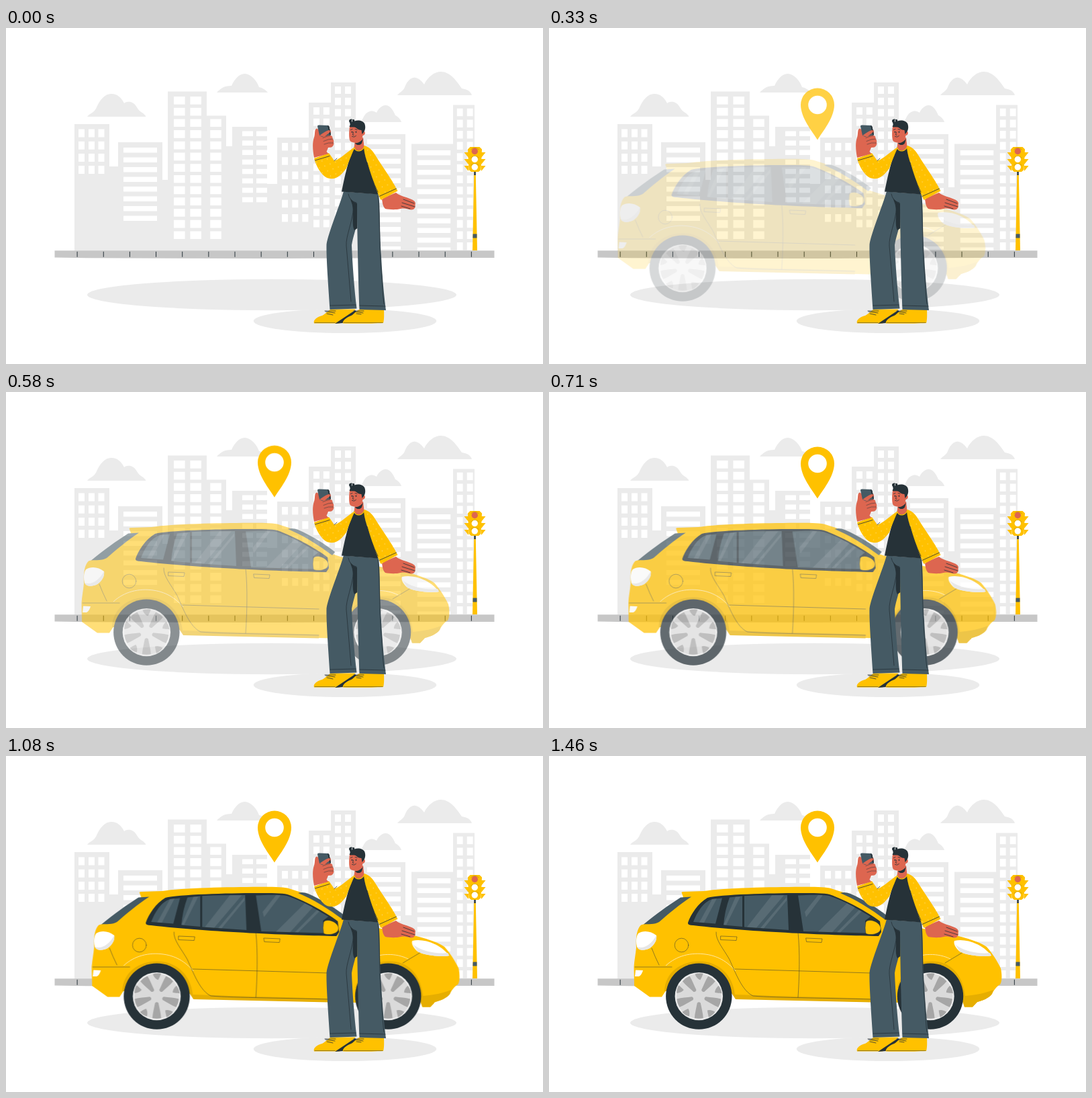
Recreate the animation shown at these times as an HTML page. Size 800 by 500 pixels, loop 1.5 s.

```html
<!DOCTYPE html>
<html lang="en">
<head>
<meta charset="utf-8">
<title>Waiting for a ride</title>
<style>
html, body { margin: 0; width: 100%; height: 100%; overflow: hidden; background: #fff; }
svg { display: block; width: 100vw; height: 100vh; }
.wall { fill: #ebebeb; }
.panes { fill: none; stroke: #fff; }
.yellow { fill: #ffc100; }
.shade { fill: #e6ae00; }
.dark { fill: #263238; }
.slate { fill: #455a64; }
.skin { fill: #dd6650; }
.white { fill: #fff; }
.line { fill: none; stroke: #263238; stroke-width: .8; stroke-linecap: round; stroke-linejoin: round; }
.thin { stroke-width: .5; }
.pin, .car { animation: 1500ms cubic-bezier(.36, -.01, .5, 1.38) infinite; }
.pin { animation-name: rise; }
.car { animation-name: arrive; }
@keyframes rise {
  0% { opacity: 0; transform: translateY(30px); }
  44.5%, 100% { opacity: 1; transform: none; }
}
@keyframes arrive {
  0% { opacity: 0; transform: translateX(-30px); }
  97.2%, 100% { opacity: 1; transform: none; }
}
</style>
</head>
<body>
<svg viewBox="0 0 800 500">
  <defs>
    <pattern id="dots" width="13" height="11" patternUnits="userSpaceOnUse" patternTransform="rotate(20)">
      <g fill="#ffdc78"><circle cx="3" cy="3" r=".7"/><circle cx="9.5" cy="8.500" r=".7"/></g>
    </pattern>
    <path id="gap" fill="#a6a6a6" d="M-2.500 10C-4 18-6 25-6.500 32.500Q0 34 6.500 32.500C6 25 4 18 2.500 10Q0 7.500-2.500 10ZM-16 18.500C-20.500 20.500-24 23-25 23.500Q-20.500 28.500-14.500 30C-13.500 25-14 21-16 18.500Z"/>
    <g id="wheel">
      <circle class="dark" r="49.200"/>
      <circle r="35.700" fill="#ebebeb"/>
      <circle r="33.300" fill="#dadada"/>
      <use href="#gap"/>
      <use href="#gap" transform="rotate(72)"/>
      <use href="#gap" transform="rotate(144)"/>
      <use href="#gap" transform="rotate(216)"/>
      <use href="#gap" transform="rotate(288)"/>
    </g>
    <path id="sleeveL" d="M520 177C509 183 499 195 489 197.500L481 186L459 194C462 206 471 221 480 223.500C492 227 500 218 507 209C511 197 516 186 520 177Z"/>
    <path id="sleeveR" d="M533 175C540 176 546 182 550 189C561 207 575 225 583.500 242.500L558.500 256C553 245 542 215 538 200C535 190 533 182 533 175Z"/>
  </defs>

  <!-- City -->
  <path class="wall" d="M102 332V143H154V206H167V170H233V226H241V94.500H299V130.500H328V176H337V147H389V232H404V163H451V111H484V81H521V158H595V237H604V172.500H666V114.500H698V332Z"/>
  <g class="panes">
    <path stroke-width="9" stroke-dasharray="12 6.200" d="M112.500 150.500v67M127.500 150.500v67M142 150.500v67"/>
    <path stroke-width="50" stroke-dasharray="7.500 7" d="M200 178v109.500"/>
    <path stroke-width="16.500" stroke-dasharray="11.700 5" d="M258.300 102v212.500M282.700 102v212.500M312.500 135.400v179"/>
    <path stroke-width="16" stroke-dasharray="7.500 6.550" d="M360 153.500v106.500M381 153.500v106.500"/>
    <path stroke-width="9" stroke-dasharray="11.500 9.700" d="M415.500 171v118M430.800 171v118M445.800 171v118"/>
    <path stroke-width="9" stroke-dasharray="11 5.750" d="M462.500 118v179.500M477.300 118v179.500M494.500 87v211M509.500 87v211"/>
    <path stroke-width="50" stroke-dasharray="7.500 7" d="M563 165.500v164"/>
    <path stroke-width="49.500" stroke-dasharray="7.500 6.950" d="M637.500 182v149"/>
    <path stroke-width="8.800" stroke-dasharray="11.500 5.100" d="M676.200 119.800v211M691.200 119.800v211"/>
  </g>
  <g class="wall">
    <path d="M121 132C126 126 130 127 134 120C140 106 148 97.500 157 98C166 98 172 104 176 112C181 108 190 109 195 118C198 125 206 126 208.500 132Z"/>
    <path d="M314 96C320 90 324 86 336 86C339 79 346 68 356 68C366 69 373 78 377 88C382 89 387 92 390 96Z"/>
    <path d="M529 140C533 132 535 126 542 124C546 123 549 124 552 126C555 119 561 115 565 115C573 115 577 123 580 130C584 132 588 136 589 140Z"/>
    <path d="M583 100C588 94 592 94 594 88C598 78 604 73 610 74C616 75 620 80 623 84C628 73 638 65 648 65C661 65 671 78 679 90C685 91 692 93 694 100Z"/>
  </g>

  <!-- Ground -->
  <path fill="#c7c7c7" d="M72.500 331.300H727.500V342H640L400 343L120 342.300L72.500 341.500Z"/>
  <path d="M105.600 336.800H694.500" fill="none" stroke="#263238" stroke-width="8" stroke-dasharray="1 38.150"/>
  <ellipse class="wall" cx="396" cy="397" rx="275" ry="23.300"/>
  <ellipse class="wall" cx="505" cy="436" rx="136.300" ry="18"/>

  <!-- Traffic light -->
  <path class="yellow" d="M697.300 218H699.800L702 331H695Z"/>
  <path class="slate" d="M695.600 306.500H701.500V312.500H695.400Z"/>
  <path class="dark" d="M697.300 213H699.800V219H697.300Z"/>
  <path class="yellow" d="M691.500 177H705.500L709 180.500L707.500 211L704 214H693L689.500 211L688 180.500Z"/>
  <path class="yellow" d="M682.500 185H689V193ZM682.500 195H689V203ZM682.500 205H689V213ZM714.500 185H708V193ZM714.500 195H708V203ZM714.500 205H708V213Z"/>
  <path fill="none" stroke="#c99800" stroke-width=".8" d="M692.500 181Q698.300 175.500 704.500 181M692.500 193.500Q698.300 187.500 704.500 193.500M692.500 204.500Q698.300 199 704.500 204.500"/>
  <circle class="skin" cx="698.300" cy="183.500" r="4.700"/>
  <circle class="white" cx="698.300" cy="195.500" r="4.700"/>
  <circle class="white" cx="698.300" cy="207" r="4.700"/>

  <!-- Map pin -->
  <path class="pin yellow" fill-rule="evenodd" d="M400 158.500C393 147 375 126 375 106.500A25 25 0 0 1 425 106.500C425 126 407 147 400 158.500ZM400 92.700A13.800 13.800 0 0 0 400 120.300A13.800 13.800 0 0 0 400 92.700Z"/>

  <!-- Car -->
  <g class="car">
    <path class="yellow" d="M197.500 203Q198 201.800 201 202L231 201C262 196 330 195 375 194.700C395 194.700 410 194.700 418 196.500L437 202.500C460 212.500 485 226 500 241C530 252 580 262 608 267.500C630 273 646 279 652 284C660 293 668 305 673 316C675 325 675 335 672 340C666 343 662 350 660 354C655 361 645 364 638 366L631 373.500H619L610 340H530L520 367L480 366L278 361L270 340H180L168 358.500H150L127 342L126.500 314C127 305 129 295 130 285C129 270 131 257 137 251.500L142 250L200 210Z"/>
    <path class="shade" d="M172 350C173 322 196 305.500 224 305.500C253 305.500 274 326 277 355L480 361V366.500L278 362L270 350ZM519 345C525 318 546 305.500 570 305.500C597 305.500 616 323 620 357Q645 355 662 348L660 354C655 361 645 364 638 366L631 373.500H619L610 350Z"/>
    <path class="slate" d="M141 250.500C160 235 178 222 196 210.500L212 209.500C194 221 177 236 164 247C157 251 148 250 141 250.500Z"/>
    <path class="slate" d="M434 204C439 202 444 203 449 205C470 214 490 227 504 238L500 243C480 228 456 213 434 204Z"/>
    <path class="dark" d="M207 248C211 236 222 219 236 211C255 206 330 204 372 204C395 204 410 204 418 206C441 214 475 232 493 246L495 262L491 268C430 267 300 262 215 252Q206 252 207 248Z"/>
    <g class="slate">
      <path d="M215 247C220 233 230 217 243 213L258 211.500L248 249.500Z"/>
      <path d="M269 210.500L288 208.500V254L260 251.500C261 238 264 224 269 210.500Z"/>
      <path d="M291 208.300C313 207 334 207 355 207L357 259L291 254.500Z"/>
      <path d="M371 207.500C395 206 410 207 417 208C440 215 462 229 479 239L471 245L472 263.500L379 261Z"/>
    </g>
    <path fill="#fff" opacity=".1" d="M243 213L250 212L231 248L224 247.500ZM278 209.500H285L264 251.500L260 251ZM332 207.300H350L309 255.500L295 254.500ZM354 210V215L320 256.500L315 256ZM401 207H408L383 240L381 232ZM444 219L456 225L422 262.300L401 261.500ZM462 229L466 231L434 262.500L429 262.300Z"/>
    <path class="yellow" stroke="#263238" stroke-width=".5" d="M472 247C475 243 484 244 490 249C496 254 495 260 490 263C485 266 476 266.500 472 264Q470 256 472 247Z"/>
    <path class="white" d="M133 264C140 259 152 260 160 267C161 274 157 281 150 286C142 290 134 290 131 284C129 276 130 268 133 264ZM129 318.500L140 319Q138 326 134 328H128ZM604 275C620 271 645 279 659 297C650 299 625 298 612 291C606 286 602 279 604 275Z"/>
    <path fill="#e6e6e6" d="M131 284C141 288 153 280 160 267C161 274 157 281 150 286C142 290 134 290 131 284ZM605 280C615 290 640 295 657 293L659 297C650 299 625 298 612 291Z"/>
    <path fill="none" stroke="#ffe8a0" d="M174 312C190 297 212 292 233 295C256 298 269 310 278 320M538 303C555 293 580 293 598 302"/>
    <g class="line thin">
      <path d="M371 263C374 290 373 330 371 359"/>
      <path d="M249 262C248 274 260 287 269 303C278 323 288 350 304 357C340 360 420 360 480 362"/>
      <path d="M277 317L480 323M153 286Q158 299 164 311M128 314H183M590 308L615 293"/>
      <path d="M256 268L280 269L279 274.500L256 273.500ZM383 271L407 272L406 277.500L384 276.500Z"/>
      <circle cx="197.500" cy="281.500" r="10.300"/>
    </g>
    <use href="#wheel" x="223.300" y="357.600"/>
    <use href="#wheel" x="568" y="357.600"/>
  </g>

  <!-- Legs and shoes -->
  <path class="yellow" d="M459 439.500C457 434 464 430 471 428C477 425 481 419 485 418.500H521L497 439.500Z"/>
  <path class="dark" d="M490 440L520 420L523 423L502 439Z"/>
  <path class="yellow" d="M501.500 439.500C502 433 510 430 516 427C520 424 523 419.500 527 419H563C563.500 430 563 436 562 439C545 440 515 440 501.500 439.500Z"/>
  <path class="line" d="M476 422L490 424M478 425L487 427M475 421L491 421M519 422L532 424M522 425L529 426M518 421L533 421"/>
  <path class="line thin" d="M460 438.500H490M503 438.500H561"/>
  <path class="slate" d="M503 243C498 262 480 305 477.500 322C477 342 480 380 482.500 419L522.500 417.500C519 390 516 350 515 323C517 310 522 299 523 286V246Z"/>
  <path class="dark" d="M511 246L524 256L523.500 298L519 301C514 290 520 270 514 258Z"/>
  <path class="slate" d="M508 244L554.500 247C558 262 556 300 559 340C561 380 564 402 566 420L526.500 419C525 380 523 300 523 261Q513 258 508 244Z"/>
  <path class="line" d="M518 266C516 290 506 310 507 324Q511 370 514 407M483 413L521 412M527 413L565 414M554.500 250C557 280 556 335 560 370Q561 396 563 411M510 247Q512 258 522 260"/>

  <!-- Torso and arms -->
  <path class="skin" d="M562 253L581 245C586 250 596 251 604 255C609 257 611 260 609.500 263C610.500 267 608 270.500 604 270.500C598 270 594 267.500 588 269C580 271 570 270 565 269C561 265 561 260 560 255Z"/>
  <path class="line" d="M592 255L608 261M590 260L609 266M589 265Q596 267 602 269"/>
  <path class="dark" d="M519 177L534 175C541 190 552 230 554.500 247.500L500 243.500C503 228 511 190 519 177Z"/>
  <path class="skin" d="M520 167L532 163L533.500 176C531 184 522 184 518.500 178Z"/>
  <path fill="none" stroke="#ffc100" stroke-width="1.200" d="M518.500 178C522 185.500 531 184 534 176"/>
  <use href="#sleeveL" class="yellow"/><use href="#sleeveL" fill="url(#dots)"/>
  <use href="#sleeveR" class="yellow"/><use href="#sleeveR" fill="url(#dots)"/>
  <path class="line" d="M460.500 197Q471 194 482 190.500M556 250.500L581.500 239M489 197.500L493 194M538 200C542 215 547 230 554 244"/>

  <!-- Hand with phone -->
  <path class="skin" d="M459 193C457 182 456 171 459 163C461 156 459 151 463 149.500C467 151 467 156 468 159C474 155 479 151 483 151.500C485 154 484 158 482 159.500Q487 160 486.500 164.500Q489 167 488 170.500Q489 173 487 175.500Q486 178 480 178L477.500 184L480.500 187Z"/>
  <path class="slate" d="M464 146Q464 144.500 466 144.500L479 145Q481 145 481.500 147L484 159L471 162L467 160Z"/>
  <path class="dark" d="M479 145Q481 145 481.500 147L484 159L482.500 160Z"/>
  <path class="skin" d="M467 160C473 156 478 152 482 152Q484 154 481.500 156L474 162Z"/>
  <path class="line thin" d="M472 163.500Q478 161 483 160M473 168.500Q480 165 487 165M474 173Q480 170 487.500 171"/>

  <!-- Head -->
  <path class="skin" d="M512 146C510.500 157 511 166 513 168.500C518 172 526 171 530 166L531.500 160C536 159.500 536 153 532 153.500L530 145Z"/>
  <path class="dark" d="M519.500 171C524 172 529 169 532 164.500L530 171.500C527 175.500 522 174.500 519.500 171Z"/>
  <path class="dark" d="M511 139C510.500 135.500 515 134.500 517 136.500Q518.500 134.500 519.500 138.500C524 136 533 138 534.500 143C536 148 535 152 533 155L530.500 158L529.500 152Q525 152 522 149C519 146 514 149 511.500 146.500Q514 143 511 139Z"/>
  <path fill="none" stroke="#fff" stroke-width=".8" d="M515.500 136.500V139.500"/>
  <circle class="dark" cx="515.500" cy="154.800" r="1"/>
  <circle class="dark" cx="521.500" cy="154.800" r="1"/>
  <path class="line" d="M513.500 151.500L516 150.500M520 150.500L523 151.500M517.500 155L516.500 159L518 159.300M515.500 161.500Q519 163.500 521.500 160.500"/>
</svg>
</body>
</html>
```
